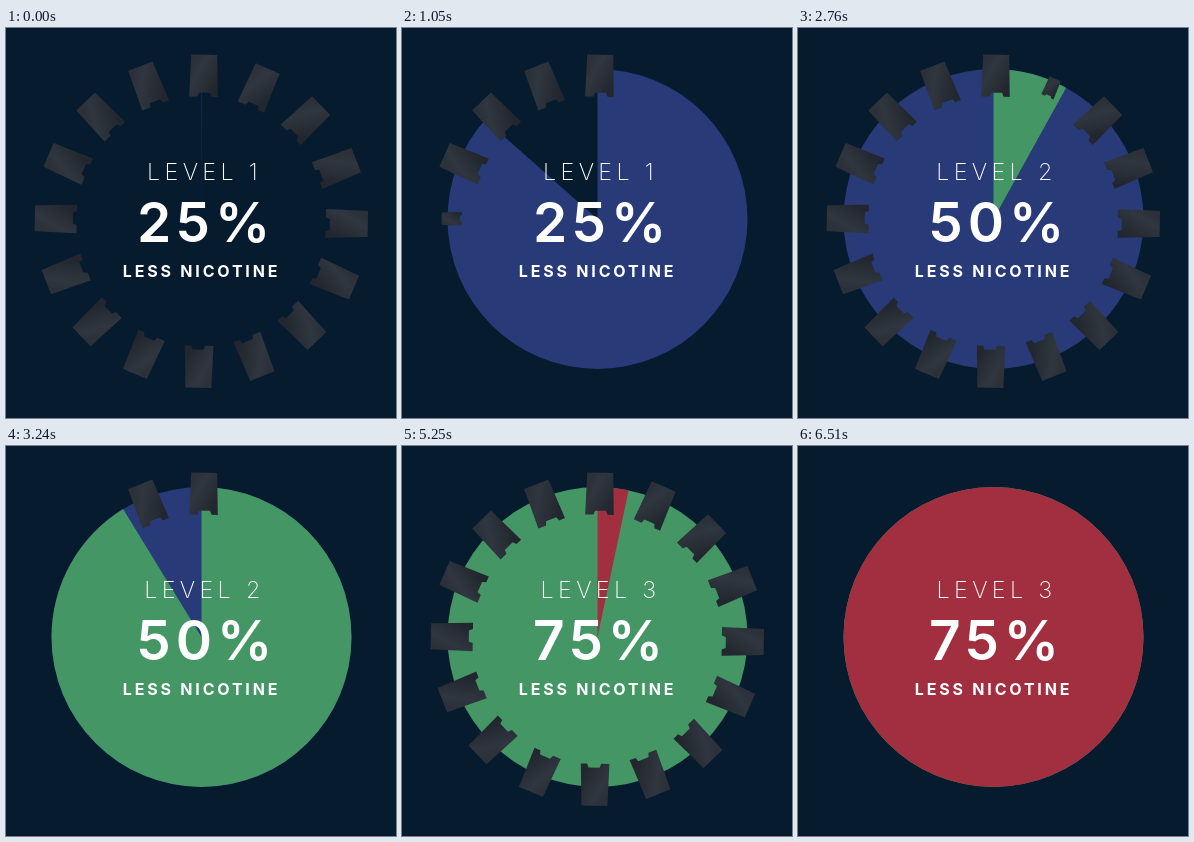
Animation of 390 by 390 pixels, one loop 7110 ms. Source, as an HTML page with a canvas:

```html
<!DOCTYPE html>
<html>
<head>
<meta charset="utf-8">
<style>
  html, body { margin: 0; height: 100%; overflow: hidden; background: #071b2f; }
  canvas { display: block; }
</style>
</head>
<body>
<canvas id="stage" width="390" height="390"></canvas>
<script>
const ctx = document.getElementById('stage').getContext('2d');
const LOOP = 7110, TAU = Math.PI * 2, PODS = 16;
const NAVY = '#071b2f', FONT = 'Inter, Lato, sans-serif';
const levels = [
  { start: -30, color: '#283a78', percent: '25%' },
  { start: 2070, color: '#449664', percent: '50%' },
  { start: 4740, color: '#a12f40', percent: '75%' }
];
const clamp = v => Math.max(0, Math.min(1, v));

// Steep ease in-out: cubic-bezier(1, 0, 0, 1), solved by bisection
function ease(x) {
  let lo = 0, hi = 1;
  for (let i = 0; i < 20; i++) {
    const s = (lo + hi) / 2;
    if (3 * s * (1 - s) ** 2 + s ** 3 < x) lo = s; else hi = s;
  }
  return lo * lo * (3 - 2 * lo);
}

function wedge(turn, color) {
  ctx.fillStyle = color;
  ctx.beginPath();
  if (turn < 0.999) ctx.moveTo(195.5, 191);
  ctx.arc(195.5, 191, 150, -TAU / 4, turn < 0.999 ? TAU * (turn - 0.25) : TAU * 0.75);
  ctx.fill();
}

const shade = ctx.createLinearGradient(-14, -8, 14, 8);
shade.addColorStop(0, '#2b3039');
shade.addColorStop(0.3, '#30363f');
shade.addColorStop(1, '#22272f');

function pod(index, scale) {
  if (scale <= 0) return;
  ctx.save();
  ctx.translate(195.3, 193.2);
  ctx.rotate(index * TAU / PODS + 0.0175);
  ctx.translate(0, -145.5);
  ctx.scale(scale, scale);
  ctx.fillStyle = shade;
  ctx.beginPath();
  ctx.moveTo(-13, -21);
  ctx.lineTo(13, -21);
  ctx.lineTo(14.3, 21);
  ctx.lineTo(8, 21);
  ctx.lineTo(6.5, 17);
  ctx.lineTo(-4.5, 17);
  ctx.lineTo(-6, 21);
  ctx.lineTo(-14.3, 21);
  ctx.closePath();
  ctx.fill();
  ctx.restore();
}

function label(text, x, y, weight, size, spacing, align) {
  ctx.font = `${weight} ${size}px ${FONT}`;
  ctx.letterSpacing = spacing + 'px';
  ctx.textAlign = align;
  ctx.fillText(text, x, y);
}

function levelText(n, alpha) {
  ctx.globalAlpha = alpha;
  label('LEVEL ' + (n + 1), 198.5, 152, 200, 23.4, 4.3, 'center');
  label(levels[n].percent, 131, 213.5, 600, 55, 5, 'left');
  ctx.globalAlpha = 1;
}

function draw(time) {
  const n = time < levels[1].start ? 0 : time < levels[2].start ? 1 : 2;
  const elapsed = time - levels[n].start;
  const fade = n ? clamp(elapsed / 300) : 1;

  ctx.fillStyle = NAVY;
  ctx.fillRect(0, 0, 390, 390);
  if (n) wedge(1, levels[n - 1].color);
  wedge(Math.max(0.0005, ease(clamp((elapsed - 40) / 1800))), levels[n].color);

  // Pods vanish one after another, the top one last
  ctx.globalAlpha = fade;
  for (let k = 1; k <= PODS; k++) pod(k, clamp((705 + 35.5 * (k - 1) - elapsed) / 30));

  ctx.fillStyle = '#fff';
  if (fade < 1) levelText(n - 1, 1 - fade);
  levelText(n, fade);
  label('LESS NICOTINE', 195.5, 248.5, 700, 16, 2.8, 'center');
}

function tick() {
  draw(performance.now() % LOOP);
  requestAnimationFrame(tick);
}
tick();
</script>
</body>
</html>
```
